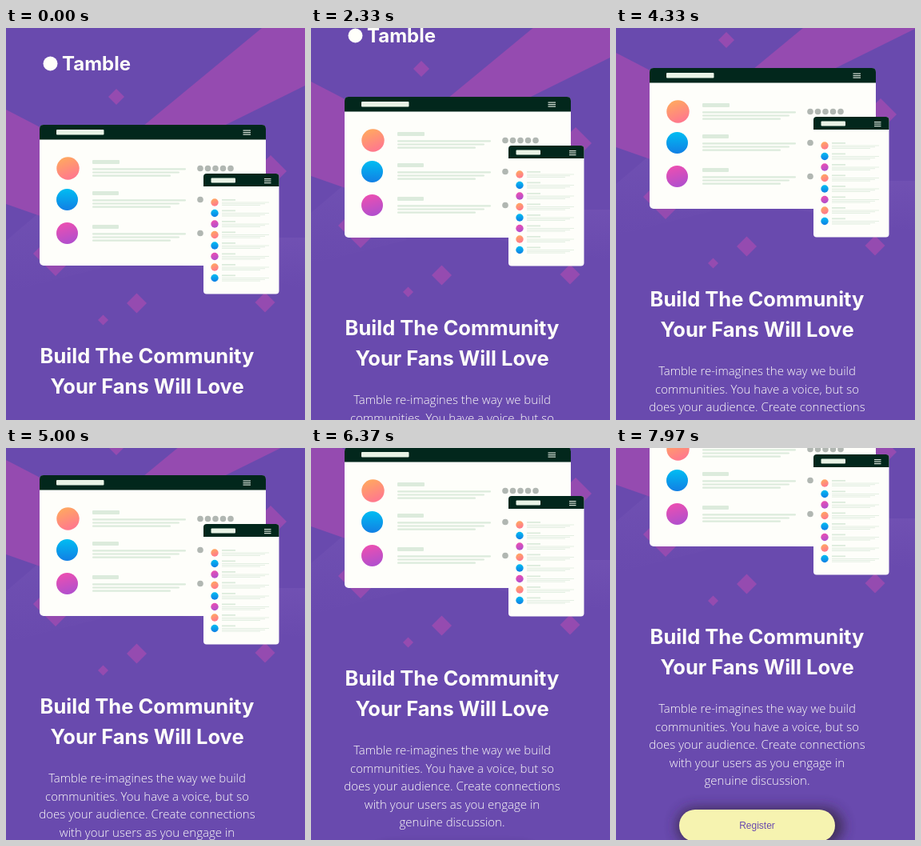
An HTML page that plays this animation: 374 px wide and 490 px high, repeating every 8 s.

```html
<!DOCTYPE html>
<html lang="en">
<head>
<meta charset="utf-8">
<title>Landing page scroll</title>
<style>
  html, body { margin: 0; width: 100%; height: 100%; overflow: hidden; background: #694aae; }
  svg { display: block; width: 374px; height: 490px; }
  .logo, .head { font-family: Inter, sans-serif; font-weight: 700; fill: #fffffa; }
  .logo { font-size: 24px; }
  .head { font-size: 25.5px; }
  .body { font: 300 15px "Open Sans", sans-serif; fill: #fffffa; }
  .label { font: 12px "Liberation Sans", Arial, sans-serif; fill: #694aae; }
  .head, .body, .label { text-anchor: middle; }
</style>
</head>
<body>
<svg viewBox="0 0 374 490">
  <defs>
    <linearGradient id="orange" x2=".4" y2="1"><stop stop-color="#ffae5a"/><stop offset="1" stop-color="#ff7a8c"/></linearGradient>
    <linearGradient id="blue" x2="0" y2="1"><stop stop-color="#00bdf2"/><stop offset="1" stop-color="#127fe4"/></linearGradient>
    <linearGradient id="pink" x2=".3" y2="1"><stop stop-color="#f24fae"/><stop offset="1" stop-color="#b44fcc"/></linearGradient>
    <linearGradient id="haze" x2="0" y2="1"><stop stop-color="#7b5ab9" stop-opacity=".4"/><stop offset="1" stop-color="#7b5ab9" stop-opacity="0"/></linearGradient>
    <filter id="blur" x="-30%" y="-100%" width="160%" height="300%"><feGaussianBlur stdDeviation="8"/></filter>
  </defs>
  <rect width="374" height="490" fill="#694aae"/>
  <g id="page"></g>
</svg>
<script>
const LOOP = 8000;
const page = document.getElementById('page');
const HUES = ['orange', 'blue', 'pink'];
const PALE = '#dcebdc', BAR = '#e9f3e6', WHITE = '#fefefa', DARK = '#02271c', MAUVE = '#954bb0';

function add(tag, attrs, text) {
  const el = document.createElementNS('http://www.w3.org/2000/svg', tag);
  for (const k in attrs) el.setAttribute(k, attrs[k]);
  if (text) el.textContent = text;
  page.append(el);
}
const rect = (x, y, width, height, fill, rx = 0) => add('rect', { x, y, width, height, fill, rx });
const disc = (cx, cy, r, fill) => add('circle', { cx, cy, r, fill });
const shape = (points, fill) => add('polygon', { points, fill });
const diamond = (x, y, r) =>
  shape(`${x - r},${y} ${x},${y - r} ${x + r},${y} ${x},${y + r}`, MAUVE);
const write = (cls, x, y, text) => add('text', { class: cls, x, y }, text);

function panel(x, y, w, h, bar, r) {
  rect(x, y, w, h, WHITE, r);
  add('path', { fill: DARK,
    d: `M${x} ${y + bar}v${r - bar}q0 ${-r} ${r} ${-r}h${w - 2 * r}q${r} 0 ${r} ${r}v${bar - r}z` });
}
function menu(x, y, w) {
  for (let i = 0; i < 3; i++) rect(x, y + i * 2.5, w, 1.2, '#d6dfd6');
}

function background() {
  shape('0,266 60,215 120,300 0,330', 'url(#haze)');
  shape('220,297 341,262 374,262 374,325', 'url(#haze)');
  shape('320,0 374,0 374,72 200,158 120,165', MAUVE);
  shape('0,102 60,133 60,241 0,220', MAUVE);
  diamond(138, 86, 10);
  diamond(331, 179, 20);
  diamond(62, 282, 28);
  diamond(163.5, 344, 12.5);
  diamond(121.5, 365, 6.5);
  diamond(324, 343, 12.5);
}

function desktop() {
  panel(42, 121, 283, 176, 18.5, 5);
  rect(63, 127, 59.5, 6.5, BAR, 1);
  menu(296.5, 127.5, 9.5);
  [175.5, 214.5, 256.5].forEach((y, i) => {
    disc(i ? 76.5 : 77.5, y, i ? 13.5 : 14.2, `url(#${HUES[i]})`);
    rect(108, y - 10.5, i ? 33 : 34, 5, PALE, 1);
    [117, 109, 98].forEach((w, k) => rect(108, y - .3 + k * 4.2, w, 2.2, PALE, 1));
    for (let k = 0; k < 5; k++) disc(243 + k * 9.5, y, 3.8, '#b1b7b2');
  });
}

function phone() {
  panel(247, 182, 94.5, 150.5, 16, 4);
  rect(256.5, 187.5, 30.5, 6, BAR, 1);
  menu(323, 188, 8.5);
  for (let i = 0; i < 8; i++) {
    const y = 218 + i * 13.5;
    disc(261, y, 4.7, `url(#${HUES[i % 3]})`);
    rect(270, y - 4, 17, 1.8, PALE);
    [59, 54, 48].forEach((w, k) => rect(270, y - .4 + k * 1.8, w, .8, PALE));
  }
}

function copy() {
  disc(55.5, 44.5, 9, '#fffffa');
  write('logo', 70, 53, 'Tamble');
  write('head', 176.5, 419, 'Build The Community');
  write('head', 176.5, 457, 'Your Fans Will Love');
  ['Tamble re-imagines the way we build',
   'communities. You have a voice, but so',
   'does your audience. Create connections',
   'with your users as you engage in',
   'genuine discussion.'
  ].forEach((line, i) => write('body', 176.5, 505 + i * 22.6, line));
}

function button() {
  add('rect', { x: 76, y: 624, width: 208, height: 46, rx: 23, fill: '#34283f', opacity: .8, filter: 'url(#blur)' });
  rect(79, 626, 195, 40, '#f6f3b0', 20);
  write('label', 176.5, 650, 'Register');
}

// Scroll keys: time in seconds, offset in pixels.
const KEYS = [[0, 0], [1.23, 17], [2.33, 35], [4.33, 71], [5.57, 102], [7.03, 140], [7.97, 174], [8, 175]];

function slope(i) {
  const a = KEYS[Math.max(i - 1, 0)], b = KEYS[Math.min(i + 1, KEYS.length - 1)];
  return (b[1] - a[1]) / (b[0] - a[0]);
}
function scrollAt(t) {
  let i = 0;
  while (i < KEYS.length - 2 && t >= KEYS[i + 1][0]) i++;
  const [t0, y0] = KEYS[i], [t1, y1] = KEYS[i + 1];
  const d = t1 - t0, u = (t - t0) / d, v = 1 - u;
  return v * v * (1 + 2 * u) * y0 + u * u * (3 - 2 * u) * y1
    + u * v * d * (v * slope(i) - u * slope(i + 1));
}

function draw(now) {
  const y = Math.round(scrollAt((now % LOOP) / 1000));
  page.setAttribute('transform', `translate(0 ${-y})`);
}
function tick() {
  draw(performance.now());
  requestAnimationFrame(tick);
}

background();
desktop();
phone();
copy();
button();
tick();
</script>
</body>
</html>
```
